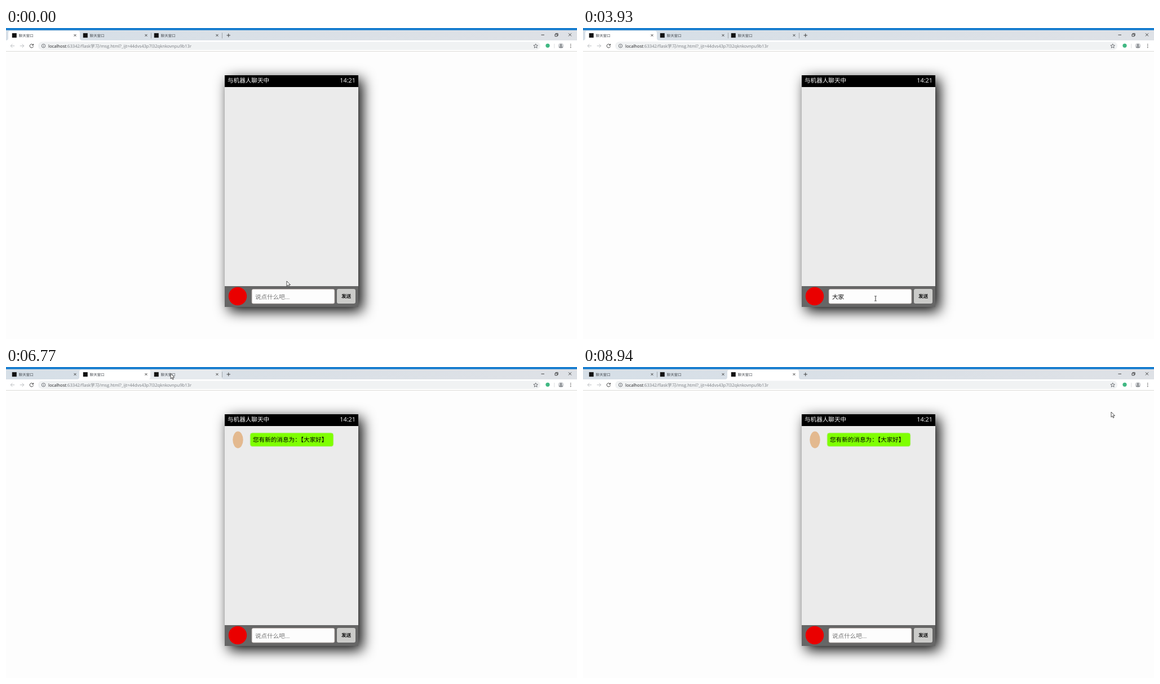
These frames come from a looping animation (1013 by 553 pixels, 8.97 s). An HTML page:

```html
<!DOCTYPE html>
<html lang="zh-CN">
<head>
<meta charset="utf-8">
<title>聊天窗口</title>
<style>
html, body { margin: 0; width: 100%; height: 100%; overflow: hidden; background: #fdfdfd; }
svg { display: block; width: 1013px; height: 553px; }
text {
  font: 10.6px "Open Sans", "Noto Sans CJK SC", "Noto Sans CJK", sans-serif;
  text-rendering: geometricPrecision;
  white-space: pre;
}
.tab text { font-size: 6.5px; fill: #454a50; }
#url { font-size: 7.65px; fill: #777b80; }
#url tspan { fill: #202124; }
#send text { font-size: 8.7px; font-weight: 700; }
.bubble rect { fill: #7fff00; stroke: #cfe6bd; }
.icon { fill: none; stroke: #333; stroke-width: .9; }
.dim { stroke: #b4b7ba; }
</style>
</head>
<body>
<svg viewBox="0 0 1013 553">
  <defs>
    <linearGradient id="strip">
      <stop offset="0" stop-color="#d6dfe7"/>
      <stop offset="1" stop-color="#dee1e6"/>
    </linearGradient>
    <filter id="blur" x="-30%" y="-20%" width="160%" height="140%" color-interpolation-filters="sRGB">
      <feGaussianBlur stdDeviation="12.5"/>
    </filter>
  </defs>

  <rect width="1013" height="553" fill="#fdfdfd"/>
  <rect width="1013" height="5" fill="#1c80d0"/>
  <rect y="4" width="1013" height="18" fill="url(#strip)"/>
  <g id="tabs"></g>
  <path class="icon" d="M391.5 13h6.5M394.75 9.8v6.5M949.5 12.3h5.5M974 11h4v3.8h-4zM975.2 11v-1.2h4v3.8h-1.2M998 9.5l5 5m0-5l-5 5"/>

  <rect y="22" width="1013" height="19" fill="#fff"/>
  <rect y="41" width="1013" height="1" fill="#dcdcd8"/>
  <rect id="pill" x="57" y="24.5" width="891" height="14.5" rx="7.25"/>
  <path class="icon dim" d="M15.2 31.8H8.2M11.4 28.6l-3.2 3.2 3.2 3.2M24.8 31.8h7M28.6 28.6l3.2 3.2-3.2 3.2"/>
  <path class="icon" stroke-width="1.1" d="M47.9 29.9a3.2 3.2 0 1 0 .6 2.6M48.6 28.2v2.4h-2.5"/>
  <g class="icon" style="stroke:#5f6368">
    <circle cx="66.5" cy="31.8" r="3.2"/>
    <path d="M66.5 31.4v2.1M66.5 29.8v.8"/>
    <path d="M939.7 28.2l1.1 2.5 2.7.2-2.1 1.8.7 2.7-2.4-1.5-2.4 1.5.7-2.7-2.1-1.8 2.7-.2z"/>
  </g>
  <text id="url" x="75" y="34.5"><tspan>localhost</tspan>:63342/flask学习/msg.html?_ijt=44dvs43p7l32qknkovnpu9b13r</text>
  <circle cx="961" cy="31.3" r="3.6" fill="#41b883"/>
  <path d="M972.8 28v8" stroke="#d4d6d8" stroke-width=".8"/>
  <circle cx="984.5" cy="31.8" r="5" fill="#d3d5d8"/>
  <circle cx="984.5" cy="30.2" r="1.7" fill="#808488"/>
  <path d="M981.2 34.9q.3-2.3 3.3-2.3t3.3 2.3z" fill="#808488"/>
  <g fill="#444"><circle cx="1001.8" cy="29" r=".8"/><circle cx="1001.8" cy="31.8" r=".8"/><circle cx="1001.8" cy="34.6" r=".8"/></g>

  <rect x="395" y="91" width="237" height="412" filter="url(#blur)"/>
  <rect x="388" y="84" width="237" height="412" fill="#ebebeb"/>
  <rect x="388" y="84" width="237" height="21"/>
  <text x="393" y="97.4" fill="#fff">与机器人聊天中</text>
  <text x="620" y="97.4" fill="#fff" text-anchor="end" style="font-size:10.9px">14:21</text>

  <g id="sent">
    <ellipse cx="598.5" cy="129.5" rx="9.5" ry="14.5" fill="#2b2022"/>
    <g class="bubble">
      <rect x="533" y="117" width="42.8" height="24.4" rx="4"/>
      <text x="538.6" y="133.3">大家好</text>
    </g>
  </g>
  <g id="reply">
    <ellipse cx="411.5" cy="129.5" rx="9.2" ry="15" fill="#e3b98f"/>
    <g class="bubble">
      <rect x="433" y="117" width="148" height="24.4" rx="4"/>
      <text x="438" y="133.3">您有新的消息为：【大家好】</text>
    </g>
  </g>

  <rect x="388" y="459" width="237" height="37" fill="#666"/>
  <circle cx="411" cy="477" r="16.2" fill="#ea0000"/>
  <rect x="436.2" y="464.6" width="146.6" height="25.4" rx="2.5" fill="#fdfdfd" stroke="#c9bfba" stroke-width=".9"/>
  <text id="field" x="442" y="481.6"></text>
  <g id="send">
    <rect x="587" y="464" width="33" height="26" rx="3"/>
    <text x="603.6" y="480" text-anchor="middle">发送</text>
  </g>

  <g id="pointer">
    <path id="arrow" d="M0 0v9.2l2.1-2 1.5 3.3 1.5-.7-1.5-3.2h2.9z" fill="#fff" stroke="#222" stroke-width=".8"/>
    <path id="beam" d="M-1.8-4.2h1.4l.4.4.4-.4h1.4M0-3.8v7.6M-1.8 4.2h1.4l.4-.4.4.4h1.4" fill="none" stroke="#222" stroke-width=".9"/>
    <path id="hand" d="M-.9.2q.9-1.1 1.8 0v3.2l3 .6q1 .3.9 1.4l-.6 3.4-.7 1.4h-4l-2.9-3.9q-.2-1.3 1-1l1.5 1.2z" fill="#fff" stroke="#222" stroke-width=".8"/>
  </g>
</svg>
<script>
const LOOP = 8970;
const $ = id => document.getElementById(id);
const show = (el, on) => { el.style.display = on ? '' : 'none'; };

// time, x, y
const path = [
  [0, 498, 450], [500, 498, 450], [1160, 493, 470], [1700, 508, 479],
  [2400, 519, 481], [4350, 519, 481], [4850, 614, 479], [5440, 614, 479],
  [6080, 204, 8], [6400, 204, 8], [6850, 300, 12], [7150, 310, 13],
  [7400, 358, 32], [7950, 358, 32], [8750, 937, 80], [LOOP, 937, 80]
];
const typed = [[0, ''], [3450, '大'], [3700, '大家'], [3950, '大家好'], [5160, '']];
const active = [[0, 0], [6260, 1], [6980, 2]];
const SENT = 5160, REPLY = 5250;

const tabX = [4, 130, 256];
$('tabs').innerHTML = tabX.map(x => `
  <g class="tab" transform="translate(${x} 0)">
    <path d="M-4 22q4 0 4-4V9q0-4 4-4H123q4 0 4 4v9q0 4 4 4z"/>
    <rect x="127" y="8.5" width=".8" height="10" fill="#90969c"/>
    <rect x="6.8" y="9.2" width="8" height="8" fill="#111"/>
    <text x="18.8" y="15.8">聊天窗口</text>
    <path class="icon" d="M116.5 11l4 4m0-4l-4 4"/>
  </g>`).join('');
const tabs = [...document.querySelectorAll('.tab')];

const stepAt = (steps, t) => steps.filter(s => s[0] <= t).pop()[1];

function pointAt(t) {
  const i = path.findIndex(p => p[0] > t);
  const [t0, x0, y0] = path[i - 1], [t1, x1, y1] = path[i];
  const u = (t - t0) / (t1 - t0), e = u * u * (3 - 2 * u);
  return [x0 + (x1 - x0) * e, y0 + (y1 - y0) * e];
}

function draw(t) {
  const [x, y] = pointAt(t);
  const over = (l, top, r, b) => x >= l && x <= r && y >= top && y <= b;
  const onPill = over(57, 24, 948, 39);
  const onSend = over(587, 464, 620, 490);
  const onField = t > 1200 && over(436, 464, 583, 490);

  const cur = stepAt(active, t);
  tabs.forEach((tab, i) => {
    const [shape, line] = tab.children;
    const hover = over(tabX[i], 5, tabX[i] + 126, 22);
    shape.setAttribute('fill', i === cur ? '#fff' : hover ? '#e6eaee' : 'none');
    show(line, i !== cur && i + 1 !== cur);
  });
  $('pill').setAttribute('fill', onPill ? '#e9ebee' : '#f0f2f3');

  show($('sent'), cur === 0 && t >= SENT);
  show($('reply'), t >= REPLY);
  $('reply').setAttribute('transform', `translate(0 ${cur === 0 ? 37 : 0})`);

  const value = stepAt(typed, t);
  $('field').textContent = value || '说点什么吧...';
  $('field').setAttribute('fill', value ? '#111' : '#757575');
  const [box, label] = $('send').children;
  box.setAttribute('fill', onSend ? '#999' : '#cbcbc9');
  label.setAttribute('fill', onSend ? '#fff' : '#111');

  $('pointer').setAttribute('transform', `translate(${x.toFixed(2)} ${y.toFixed(2)})`);
  show($('hand'), onSend);
  show($('beam'), onPill || onField);
  show($('arrow'), !onSend && !onPill && !onField);
}

const start = performance.now();
function tick() {
  draw((performance.now() - start) % LOOP);
  requestAnimationFrame(tick);
}
tick();
</script>
</body>
</html>
```
